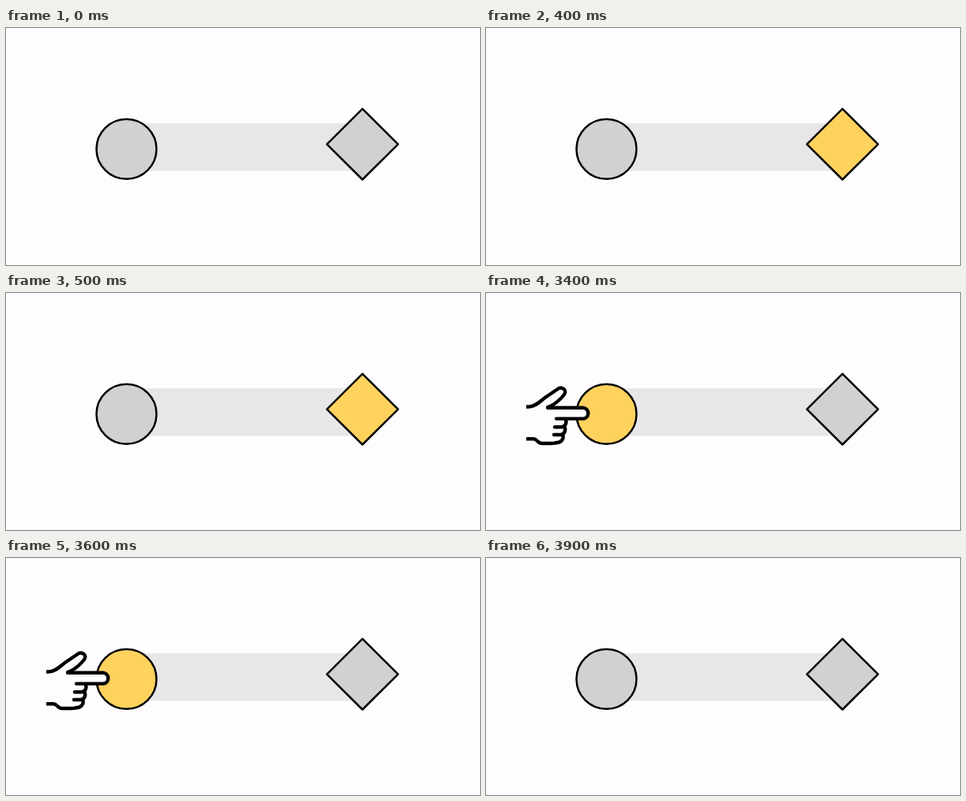
These frames come from a looping animation (600 by 301 pixels, 8 s). An HTML page:

```html
<!DOCTYPE html>
<html lang="en">
<head>
<meta charset="utf-8">
<title>Circle and diamond</title>
<style>
html, body { margin: 0; width: 100%; height: 100%; overflow: hidden; background: #fefcff; }
svg { display: block; width: 600px; height: 301px; }
.shape { fill: #d2d0d3; stroke: #000; stroke-width: 2.5; stroke-linejoin: round; }
.shape.lit { fill: #ffd25e; }
#hand { fill: none; stroke: #000; stroke-width: 4.4; stroke-linejoin: round; }
#hand .finger { fill: #fefcff; stroke-linecap: round; }
#hand .folds { stroke-linecap: round; }
</style>
</head>
<body>
<svg viewBox="0 0 600 301">
  <rect x="152" y="121" width="299" height="60.5" fill="#e8e6e9"/>
  <circle id="circle" class="shape" cx="152.5" cy="153.7" r="38"/>
  <path id="diamond" class="shape" d="M451.2 102.7L496.3 147.6L451.2 192.5L406.2 147.6Z"/>
  <g id="hand" visibility="hidden">
    <path d="M51 144.5H54C63 144.5 69 137 76 132L90 122.5C96 118 103 123 99 129C95 134 90 139 83 143L77 145.5"/>
    <path class="finger" d="M78 145.8H123.5A7 7 0 0 1 123.5 159.6H89"/>
    <path class="folds" d="M100.5 160.5C103 165 100 170.3 95 170.3H87M99.5 170C101.5 175 99 180 94 180H86M97.5 180.5C98.5 186 95 190.3 88 190.3"/>
    <path d="M51 185.3H60C65 185.3 65 191 71 191H83Q87 191 90 190"/>
  </g>
</svg>
<script>
const byId = id => document.getElementById(id);
const [circle, diamond, hand] = ['circle', 'diamond', 'hand'].map(byId);

function draw(now) {
  const t = now % 8000;
  const within = (from, to) => t >= from && t < to;
  const pressed = within(3400, 3900);
  diamond.classList.toggle('lit', within(200, 700));
  circle.classList.toggle('lit', pressed);
  hand.setAttribute('visibility', pressed ? 'visible' : 'hidden');
}

const start = performance.now();
function tick() {
  draw(performance.now() - start);
  requestAnimationFrame(tick);
}
tick();
</script>
</body>
</html>
```
